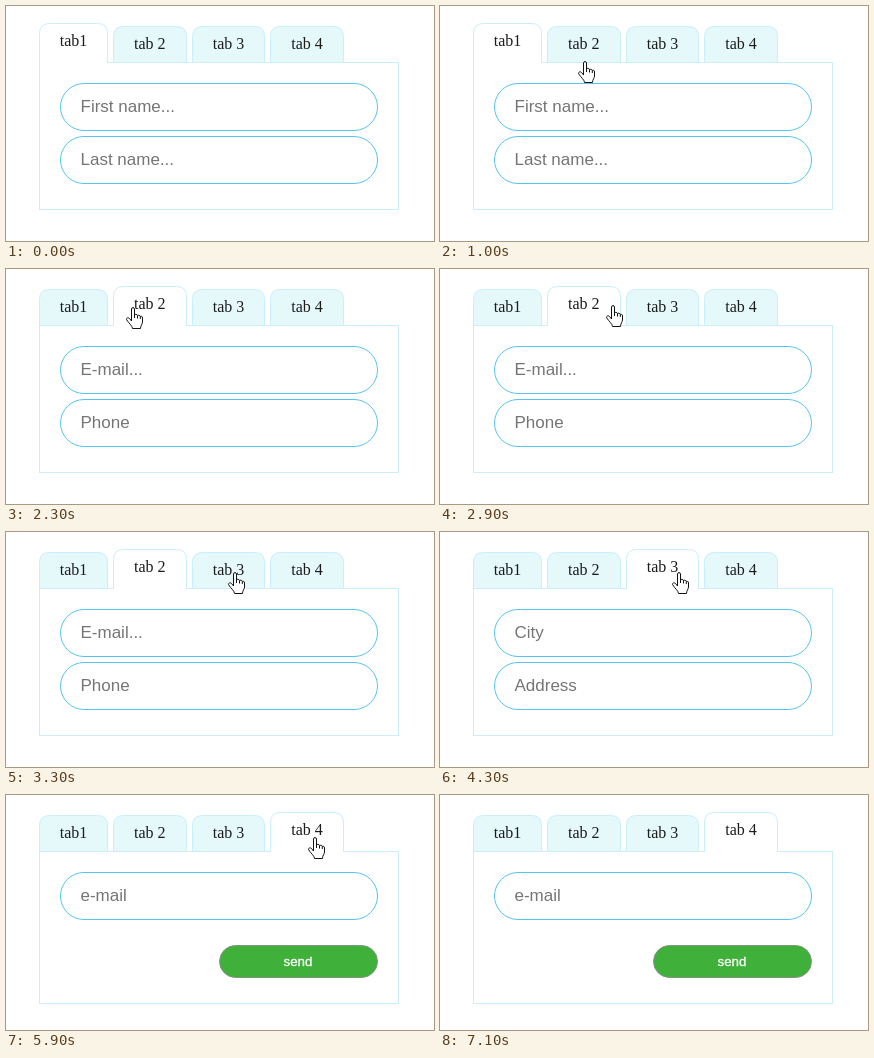
An HTML page for the animation above (7900 ms loop, 428 by 235 pixels).

```html
<!DOCTYPE html>
<html lang="en">
<head>
<meta charset="utf-8">
<title>Tabs</title>
<style>
  html, body { margin: 0; width: 100%; height: 100%; overflow: hidden; background: #fff; }
  svg { display: block; width: 100%; height: 100%; }
  .tab path { fill: #e5f9fb; stroke: #c9effc; }
  .tab.active path { fill: #fff; }
  .tab text { font: 16px "Liberation Serif", "Times New Roman", serif; fill: #1c1c1c; }
  .panel { fill: #fff; stroke: #cbeefb; }
  .field rect { fill: #fff; stroke: #55c5ee; }
  .field text { font: 17px "Liberation Sans", Arial, sans-serif; fill: #757575; }
  .send rect { fill: #3fb13a; stroke: #83937f; }
  .send text { font: 13.33px "Liberation Sans", Arial, sans-serif; fill: #fff; stroke: #fff; stroke-width: .3; text-anchor: middle; }
  .cursor { fill: #fff; stroke: #111; stroke-linejoin: round; }
</style>
</head>
<body>
<svg viewBox="0 0 428 235">
  <rect id="panel" class="panel" x="33.5" y="56.5" width="359" height="147"/>
  <g id="tabs"></g>
  <g id="first" class="field">
    <rect x="54.5" y="77.5" width="317" height="47" rx="23.5"/>
    <text x="74.5" y="106"></text>
  </g>
  <g id="second" class="field">
    <rect x="54.5" y="130.5" width="317" height="47" rx="23.5"/>
    <text x="74.5" y="159"></text>
  </g>
  <g id="send" class="send">
    <rect x="213.5" y="150.5" width="158" height="32" rx="16"/>
    <text x="292" y="171">send</text>
  </g>
  <g id="hand" class="cursor">
    <path d="M5.5 14V2C5.5 .1 8.5 .1 8.5 2V8C9 7 11.5 7 11.5 8.8C12 7.8 14 8 14.3 9.5C15 8.8 16.5 9.2 16.5 11V15C16.5 17 14.5 18.5 14.5 21.5H6.5C6.5 19 3 16.5 .8 13C-.2 11.2 2.2 10 3.5 11.5Z"/>
    <path d="M8.5 8V11M11.5 9V11.5M14.3 9.5V12" fill="none"/>
  </g>
  <path id="arrow" class="cursor" d="M.5 .5V16.5L4.2 13L6.6 18.5L9 17.4L6.7 12H11.5Z"/>
</svg>
<script>
const LOOP = 7900, STEP = 100;
const $ = id => document.getElementById(id);

const tabs = [
  { label: "tab1", x: 33, w: 69, textX: 53.7, fields: ["First name...", "Last name..."], from: 0 },
  { label: "tab 2", x: 107, w: 74, textX: 128, fields: ["E-mail...", "Phone"], from: 2300 },
  { label: "tab 3", x: 186, w: 73, textX: 206.7, fields: ["City", "Address"], from: 4000 },
  { label: "tab 4", x: 264, w: 74, textX: 285.2, fields: ["e-mail"], from: 5900 }
];

// Pointer tip: time, x, y
const route = [
  [400, 351, 42], [1000, 144, 55], [1100, 121, 53], [1400, 99, 47], [1600, 99, 47],
  [1900, 126, 38], [2500, 126, 38], [2900, 172, 36], [3300, 228, 40], [4200, 228, 40],
  [5000, 308, 42], [6600, 308, 42], [7000, 405, 40]
];
const LEAVE = 7100;

function make(tag, parent) {
  return parent.appendChild(document.createElementNS("http://www.w3.org/2000/svg", tag));
}

for (const tab of tabs) {
  tab.node = make("g", $("tabs"));
  tab.shape = make("path", tab.node);
  tab.text = make("text", tab.node);
  tab.text.textContent = tab.label;
  tab.text.setAttribute("x", tab.textX);
}

function tabPath(x, w, top, bottom) {
  const l = x + .5, r = x + w - .5, c = 10;
  return `M${l} ${bottom}V${top + c}Q${l} ${top} ${l + c} ${top}H${r - c}Q${r} ${top} ${r} ${top + c}V${bottom}`;
}

function show(node, on) {
  node.setAttribute("visibility", on ? "visible" : "hidden");
}

function select(active) {
  for (const tab of tabs) {
    const on = tab === active;
    tab.node.setAttribute("class", on ? "tab active" : "tab");
    tab.shape.setAttribute("d", tabPath(tab.x, tab.w, on ? 17.5 : 20.5, on ? 57 : 56));
    tab.text.setAttribute("y", on ? 40 : 43);
  }
  const [first, second] = active.fields;
  $("first").lastElementChild.textContent = first;
  $("second").lastElementChild.textContent = second || "";
  show($("second"), second);
  show($("send"), !second);
  $("panel").setAttribute("height", second ? 147 : 152);
}

function pointerAt(t) {
  if (t < route[0][0] || t >= LEAVE) return null;
  const i = route.findIndex(k => k[0] > t);
  if (i < 0) return route[route.length - 1].slice(1);
  const [t0, x0, y0] = route[i - 1], [t1, x1, y1] = route[i];
  const p = (t - t0) / (t1 - t0);
  return [Math.round(x0 + (x1 - x0) * p), Math.round(y0 + (y1 - y0) * p)];
}

function drawPointer(t) {
  const tip = pointerAt(t);
  const overTab = tip && tabs.some(tab => tip[0] >= tab.x && tip[0] < tab.x + tab.w);
  show($("hand"), tip && overTab);
  show($("arrow"), tip && !overTab);
  if (!tip) return;
  const [x, y] = tip;
  $("hand").setAttribute("transform", `translate(${x - 6} ${y})`);
  $("arrow").setAttribute("transform", `translate(${x} ${y})`);
}

function draw(time) {
  const t = Math.floor(time % LOOP / STEP) * STEP;
  select(tabs.filter(tab => tab.from <= t).pop());
  drawPointer(t);
}

let start;
function tick(now) {
  start ??= now;
  draw(now - start);
  requestAnimationFrame(tick);
}
draw(0);
requestAnimationFrame(tick);
</script>
</body>
</html>
```
